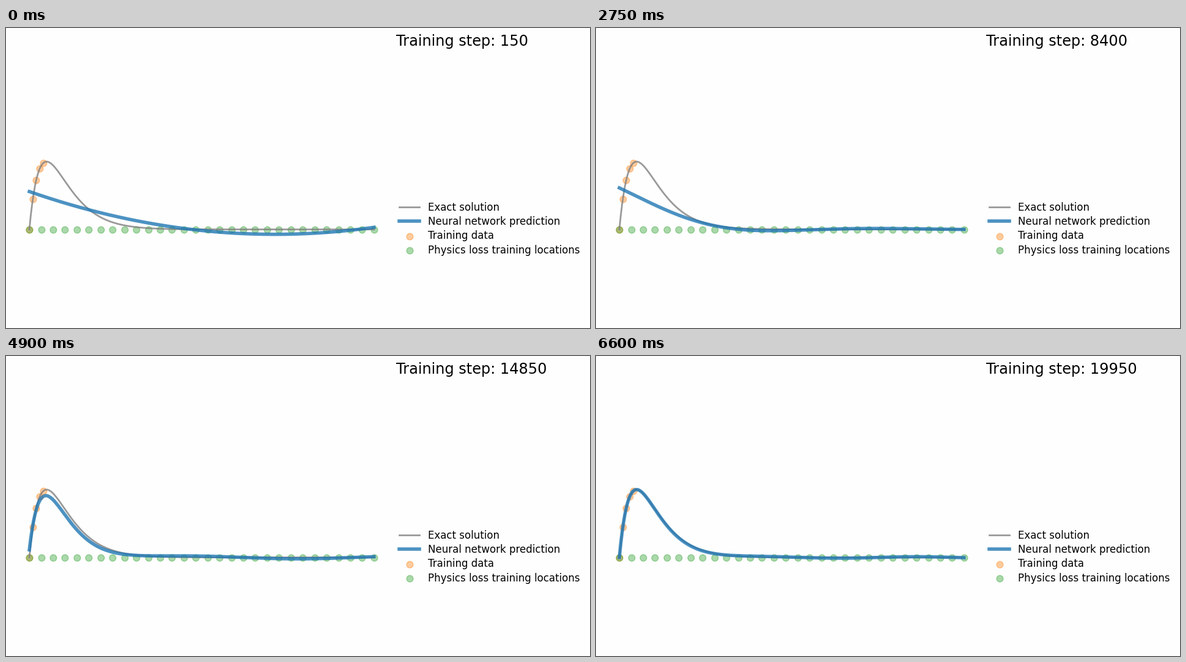
A matplotlib script that plays this animation: 955 px wide and 491 px high, repeating every 6.65 s.

```python
import matplotlib.pyplot as plt
import numpy as np
from matplotlib.animation import FuncAnimation

W, H, DPI = 955, 491, 100
FRAMES, STEP_MS = 133, 50
X0, SPAN, Y0 = 38.18, 563.64, 329.7   # pixel origin and unit length of the plot
PEAK, TAU = 111, 0.05                 # critically damped response
GRAY, BLUE = ("grey", 2), ("tab:blue", 4)

t = np.linspace(0, 1, 500)
truth = PEAK * t / TAU * np.exp(1 - t / TAU)


def px(u):
    return X0 + SPAN * u


def smooth_guess(ms):
    """Early fit: a cubic given by its inverse roots, under a Gaussian decay."""
    def at(*values):
        return np.interp(ms, (0, 1500, 2750, 3550, 4300), values)

    roots = at(2.12, 2.25, 2.86, 3.12, 0), at(1.05, 1.09, 1.72, 2.63, 0), at(0, 0, 1, 1, 0)
    lift, decay = at(0, 0, 1.65, 4.73, 0), at(0, 1.1, 4.46, 11.25, 59)
    height = min(62 + 0.0024 * ms, 68)
    cubic = np.prod([1 - q * t for q in roots], axis=0)
    return height * cubic * np.exp(lift * t - decay * t ** 2)


def ripple(ms):
    """Late wave along the tail that shrinks and tightens."""
    size = np.interp(ms, (3550, 4300, 5400, 6600), (0, 2.4, 2.2, 1.2))
    period = np.interp(ms, (5400, 6600), (0.64, 0.45))
    gate = 1 - np.exp(-(t / 0.1) ** 2)
    return size * gate * np.sin(2 * np.pi * (t - 0.3) / period)


def prediction(ms):
    learned = 1 / (1 + np.exp((4623 - ms) / 186))
    return learned * truth + (1 - learned) * smooth_guess(ms) + ripple(ms)


plt.rcParams["font.family"] = "DejaVu Sans"
fig = plt.figure(figsize=(W / DPI, H / DPI), dpi=DPI, facecolor="#fefefe")
ax = fig.add_axes([0, 0, 1, 1])
ax.set(xlim=(0, W), ylim=(H, 0))
ax.axis("off")


def line(x, y, color, width):
    return ax.plot(x, y, color=color, linewidth=width, alpha=0.8)[0]


def dots(x, y, color):
    ax.scatter(x, y, s=60, color=color, alpha=0.4)


line(px(t), Y0 - truth, *GRAY)
fit = line(px(t), Y0 - truth, *BLUE)
dots(px(t[:25:5]), Y0 - truth[:25:5], "tab:orange")
dots(px(np.linspace(0, 1, 30)), np.full(30, Y0), "tab:green")

# Legend
labels = ["Exact solution", "Neural network prediction",
          "Training data", "Physics loss training locations"]
base = 298.7 + 23.33 * np.arange(4)
for y, label in zip(base, labels):
    ax.text(689.6, y, label, fontsize=12, color="k")
for y, style in zip(base[:2], (GRAY, BLUE)):
    line([642.9, 676.2], [y - 5.83] * 2, *style)
for y, color in zip(base[2:], ("tab:orange", "tab:green")):
    dots([659.6], [y - 4.4], color)

title = ax.text(638.45, 29, "", fontsize=17.28, color="k")


def update(i):
    fit.set_ydata(Y0 - prediction(i * STEP_MS))
    title.set_text(f"Training step: {150 * (i + 1)}")
    return fit, title


anim = FuncAnimation(fig, update, frames=FRAMES, interval=STEP_MS,
                     repeat=True, repeat_delay=0)
plt.show()
```
